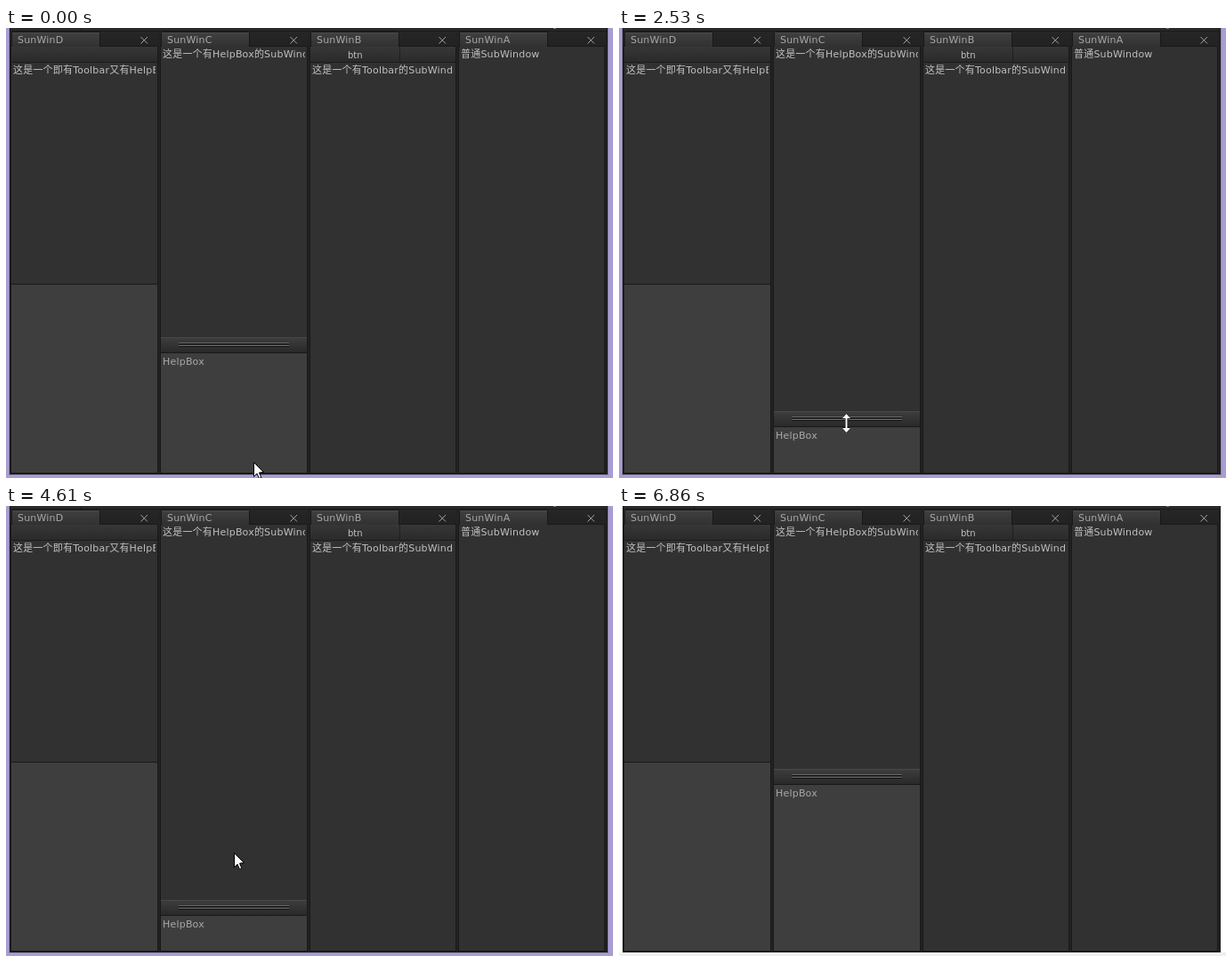
Recreate the animation shown at these times as an HTML page with a canvas. Size 682 by 505 pixels, loop 6940 ms.

```html
<!DOCTYPE html>
<html lang="zh-CN">
<head>
<meta charset="utf-8">
<title>Sub windows</title>
<style>
html, body { margin: 0; width: 100%; height: 100%; overflow: hidden; background: #222; }
canvas { display: block; width: 682px; height: 505px; }
</style>
</head>
<body>
<canvas id="stage" width="682" height="505"></canvas>
<script>
const ctx = document.getElementById('stage').getContext('2d');
const LOOP = 6940;
const FLASH = 6860;
const FONT = '"DejaVu Sans", "Noto Sans CJK SC", "Noto Sans CJK", sans-serif';

// Splitter position over time: [ms, top]
const SPLITS = [
  [0, 347], [820, 214], [940, 290], [1070, 331], [1210, 289], [1330, 243],
  [2280, 305], [2400, 385], [2530, 430], [2680, 443], [2830, 455], [2950, 463],
  [3070, 466], [3500, 442], [5350, 295], [5480, 355], [5630, 320], [5750, 295]
];

// Pointer over time: [ms, kind, x, y]; arrow uses its tip, size its centre
const POINTERS = [
  [0, 'arrow', 278, 487], [120, 'arrow', 268, 428], [240, 'arrow', 257, 366],
  [390, 'arrow', 255, 358], [540, 'size', 255.5, 357],
  [820, 'size', 239.5, 224.5], [940, 'size', 246.5, 300], [1070, 'size', 250.5, 341],
  [1210, 'size', 251.5, 299], [1330, 'size', 250.5, 253],
  [1480, 'arrow', 255, 258], [1600, 'size', 246.5, 252], [1720, 'size', 241.5, 250.5],
  [2280, 'size', 247.5, 314], [2400, 'size', 252.5, 396], [2530, 'size', 255.5, 443.5],
  [2680, 'size', 257.5, 450], [2830, 'size', 259.5, 462], [2950, 'size', 261.5, 470],
  [3070, 'arrow', 260, 477], [3350, 'arrow', 258, 477], [3500, 'size', 259.5, 454],
  [3630, 'arrow', 256, 484], [3780, 'size', 256.5, 456], [3900, 'arrow', 249, 436],
  [4180, 'size', 259.5, 456], [4460, 'arrow', 252, 435], [4610, 'arrow', 256, 389],
  [4740, 'arrow', 250, 429], [4890, 'size', 253.5, 445], [5200, 'size', 251.5, 451],
  [5350, 'size', 234.5, 303], [5480, 'size', 240.5, 363], [5630, 'size', 245.5, 328],
  [5750, 'size', 248.5, 303], [5900, 'arrow', 406, 398], [6050, 'none', 0, 0]
];

const PANELS = [
  { x: 5, w: 166, close: 155, title: 'SunWinD', text: '这是一个即有Toolbar又有HelpBox的SubWindow', bar: true },
  { x: 173, w: 166, close: 323, title: 'SunWinC', text: '这是一个有HelpBox的SubWindow' },
  { x: 341, w: 165, close: 490, title: 'SunWinB', text: '这是一个有Toolbar的SubWindow', bar: true, button: 'btn' },
  { x: 508, w: 165, close: 657, title: 'SunWinA', text: '普通SubWindow' }
];

const at = (list, t) => list.filter(step => step[0] <= t).pop();

function box(x, y, w, h, fill) {
  ctx.fillStyle = fill;
  ctx.fillRect(x, y, w, h);
}

function shade(x, y, w, h, top, bottom) {
  const g = ctx.createLinearGradient(0, y, 0, y + h);
  g.addColorStop(0, top);
  g.addColorStop(1, bottom);
  box(x, y, w, h, g);
}

function label(text, x, y, color, size = 11) {
  ctx.font = `${size}px ${FONT}`;
  ctx.letterSpacing = size === 11 ? '0.2px' : '0px';
  ctx.fillStyle = color;
  ctx.fillText(text, x, y);
}

function polygon(points) {
  ctx.beginPath();
  points.forEach(([x, y]) => ctx.lineTo(x, y));
  ctx.closePath();
}

function drawTab({ x, w, title, close }) {
  shade(x, 4, w, 16, '#262626', '#222');
  box(x, 20, w, 1, '#1a1a1a');
  ctx.beginPath();
  ctx.roundRect(x + 1, 4, 100, 17, [3, 3, 0, 0]);
  ctx.fillStyle = '#181818';
  ctx.fill();
  shade(x + 2, 5, 98, 16, '#404040', '#313131');
  box(x + 3, 5, 96, 1, '#4c4c4c');
  label(title, x + 8, 17, '#a8a8a8');
  ctx.strokeStyle = '#a4a4a4';
  ctx.lineWidth = 1;
  ctx.beginPath();
  ctx.moveTo(close - 3.5, 10);
  ctx.lineTo(close + 4, 17.5);
  ctx.moveTo(close + 4, 10);
  ctx.lineTo(close - 3.5, 17.5);
  ctx.stroke();
}

function drawPanel(p) {
  const { x, w } = p;
  box(x, 20, w, 480, '#191919');
  box(x + 1, 21, w - 2, 478, '#313131');
  drawTab(p);
  if (p.bar) {
    shade(x + 1, 21, w - 2, 17, '#373737', '#2a2a2a');
    box(x + 1, 38, w - 2, 1, '#1c1c1c');
  }
  if (p.button) {
    box(x + 101, 21, 1, 17, '#1f1f1f');
    label(p.button, x + 43, 34, '#c0c0c0', 10);
  }
  ctx.save();
  ctx.beginPath();
  ctx.rect(x, 21, w - 3, 478);
  ctx.clip();
  label(p.text, x + 3, p.bar ? 51 : 33, '#c0c0c0');
  ctx.restore();
}

function drawHelpBox(top) {
  box(174, top + 18, 164, 499 - top - 18, '#3e3e3e');
  shade(174, top, 164, 17, '#3e3e3e', '#292929');
  box(174, top, 164, 1, '#484848');
  box(174, top + 17, 164, 1, '#191919');
  for (const y of [top + 6, top + 9]) {
    box(194, y, 124, 1, '#686868');
    box(194, y + 1, 124, 1, '#101010');
  }
  ctx.save();
  ctx.beginPath();
  ctx.rect(174, 21, 164, 478);
  ctx.clip();
  label('HelpBox', 176, top + 31, '#a8a8a8');
  ctx.restore();
}

function drawPointer([, kind, x, y]) {
  if (kind === 'none') return;
  ctx.save();
  ctx.translate(x, y);
  ctx.lineWidth = 1;
  ctx.strokeStyle = '#000';
  ctx.fillStyle = '#fff';
  if (kind === 'arrow') {
    polygon([[.5, .5], [.5, 16.5], [4, 13], [6.5, 18.5], [8.8, 17.5], [6.5, 12], [11.5, 11.5]]);
    ctx.fill();
    ctx.stroke();
  } else {
    const half = [[0, -10.5], [4.5, -5.5], [1, -5.5], [1, 5.5], [4.5, 5.5], [0, 10.5]];
    const mirror = half.slice(1, -1).reverse().map(([px, py]) => [-px, py]);
    polygon([...half, ...mirror]);
    ctx.stroke();
    ctx.fill();
  }
  ctx.restore();
}

function drawFrame(flash) {
  box(0, 0, 682, 505, flash ? '#fff' : '#a99dd2');
  if (flash) box(0, 501, 682, 4, '#efefef');
  else {
    box(3, 0, 1, 502, '#9289b4');
    box(676, 0, 1, 502, '#9289b4');
    box(3, 501, 674, 1, '#9289b4');
  }
  box(4, 0, 672, 501, '#1b1b1b');
  box(5, 0, 670, 500, '#222');
  box(5, 0, 670, 3, '#292929');
  box(84, 0, 1, 3, '#1c1c1c');
  box(615, 0, 3, 1, '#777');
  box(5, 3, 670, 1, '#1b1b1b');
}

function draw(t) {
  drawFrame(t >= FLASH);
  PANELS.forEach(drawPanel);
  box(6, 287, 164, 1, '#191919');
  box(6, 288, 164, 211, '#3e3e3e');
  drawHelpBox(at(SPLITS, t)[1]);
  drawPointer(at(POINTERS, t));
}

const start = performance.now();
function tick() {
  draw((performance.now() - start) % LOOP);
  requestAnimationFrame(tick);
}
tick();
</script>
</body>
</html>
```
